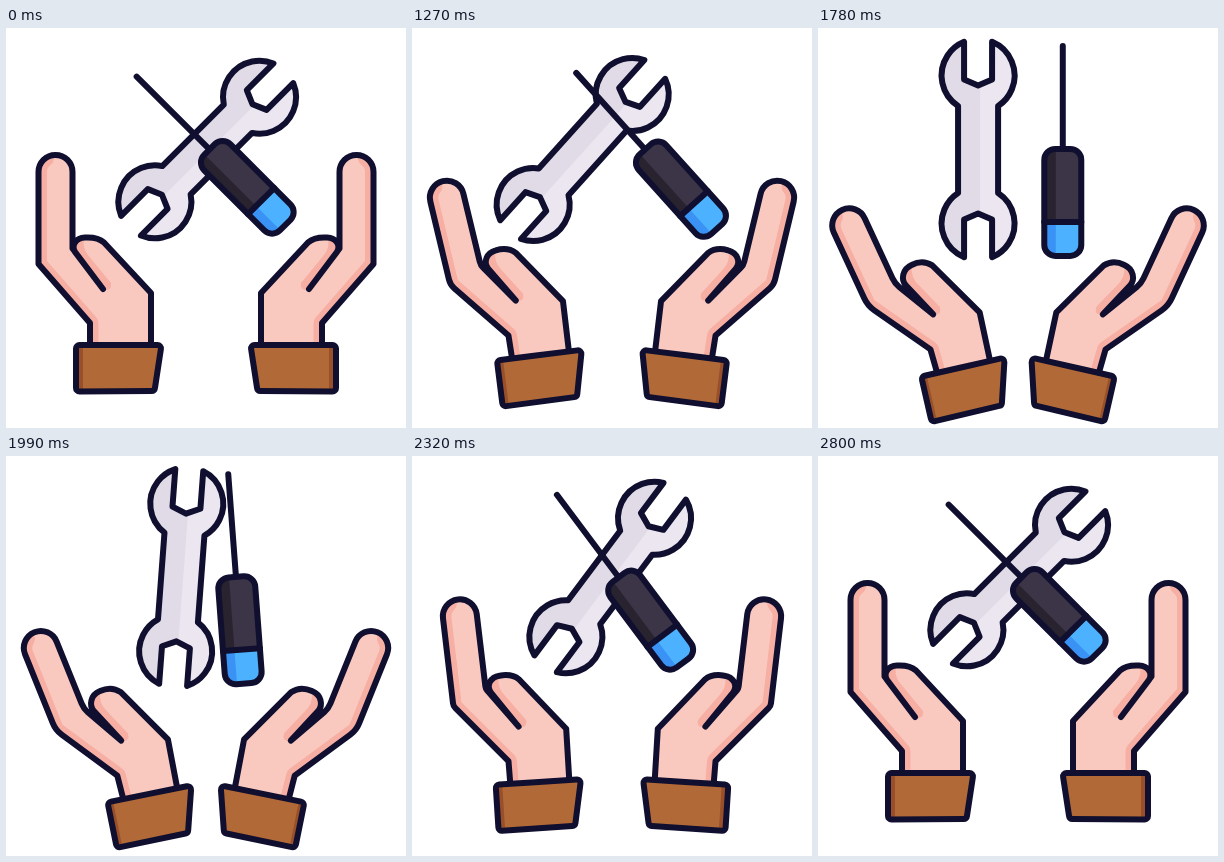
Recreate the animation shown at these times as an HTML page with a canvas. Size 400 by 400 pixels, loop 2.83 s.

```html
<!DOCTYPE html>
<html lang="en">
<head>
<meta charset="utf-8">
<title>Tools between hands</title>
<style>
  html, body { margin: 0; width: 100%; height: 100%; overflow: hidden; background: #fff; }
  canvas { display: block; }
</style>
</head>
<body>
<canvas id="stage" width="400" height="400"></canvas>
<script>
const ctx = document.getElementById('stage').getContext('2d');
const LOOP = 2830, START = 1030, STEP = 30, DEG = Math.PI / 180;
const INK = '#100f2f', SKIN = '#f9c9c0', SKIN_SHADE = '#f7afa3';

// Motion tracks: [ms, value]
const SLIDE = [[1030, 0], [1270, 30.5], [1510, 53], [1990, 26], [2320, 3], [2470, 0]];
const TILT = [[1030, 45], [1170, 45], [1270, 42], [1510, 13.3], [1690, 0], [1870, 0],
              [1990, 4.3], [2320, 36.8], [2480, 45]];
const SHIFT = [[1030, 0], [1270, .49], [1510, .98], [1720, 1.06], [1990, 1], [2320, .43], [2690, 0]];
const OPEN = [[1030, 0], [1270, .55], [1510, 1], [1630, 1.02], [1990, .88], [2320, .28], [2640, 0]];

// Smooth interpolation that never overshoots its keys
function track(keys, t) {
  const last = keys.length - 1;
  if (t <= keys[0][0]) return keys[0][1];
  if (t >= keys[last][0]) return keys[last][1];
  const slope = i => (keys[i + 1][1] - keys[i][1]) / (keys[i + 1][0] - keys[i][0]);
  const tangent = i => {
    if (i === 0 || i === last) return 0;
    const a = slope(i - 1), b = slope(i);
    return a * b > 0 ? 2 * a * b / (a + b) : 0;
  };
  const i = keys.findIndex(k => k[0] > t) - 1;
  const [t0, v0] = keys[i], [t1, v1] = keys[i + 1];
  const d = t1 - t0, u = (t - t0) / d, s = u * u * (3 - 2 * u);
  return v0 + (v1 - v0) * s + d * u * (1 - u) * ((1 - u) * tangent(i) - u * tangent(i + 1));
}

function at(x, y, degrees, draw) {
  ctx.save();
  ctx.translate(x, y);
  ctx.rotate(degrees * DEG);
  draw();
  ctx.restore();
}

// Fill a path, paint its shading inside it, then outline it
function shape(path, fill, shade) {
  ctx.fillStyle = fill;
  ctx.fill(path);
  ctx.save();
  ctx.clip(path);
  shade();
  ctx.restore();
  ctx.stroke(path);
}

function rect(color, x, y, w, h) {
  ctx.fillStyle = color;
  ctx.fillRect(x, y, w, h);
}

function line(x0, y0, x1, y1) {
  ctx.beginPath();
  ctx.moveTo(x0, y0);
  ctx.lineTo(x1, y1);
  ctx.stroke();
}

function wrenchPath() {
  const path = new Path2D();
  for (const s of [1, -1]) {
    const turn = s > 0 ? 0 : Math.PI;
    const jaw = (y0, x0, y1, x1) => path.arc(0, -74 * s, 36.5,
      Math.atan2(y0, x0) + turn, Math.atan2(y1, x1) + turn);
    jaw(30.5, -20, -33.7, -14);
    path.lineTo(-14 * s, -70 * s);
    path.lineTo(0, -64 * s);
    path.lineTo(14 * s, -70 * s);
    jaw(-33.7, 14, 30.5, 20);
  }
  path.closePath();
  return path;
}

const WRENCH = wrenchPath(), HANDLE = new Path2D();
HANDLE.roundRect(-18.5, -2, 37, 107, 11);

function wrench() {
  shape(WRENCH, '#e0dbe6', () => rect('#ebe6f0', 2, -112, 40, 224));
}

function screwdriver() {
  line(0, -105, 0, -2);
  shape(HANDLE, '#3c3447', () => {
    rect('#292330', -19, -2, 12, 73);
    rect('#4cb2ff', -19, 71, 38, 35);
    rect('#3a92f5', -19, 71, 12, 35);
  });
  line(-18.5, 71, 18.5, 71);
}

function hand(shift, open) {
  const mix = (a, b) => a + (b - a) * open;
  const tip = [mix(49.5, 34.8), mix(144, 153.6), 17], lean = 12 * DEG * open;
  const heel = [mix(32.5, 35), 236], wrist = [mix(84, 86.5), mix(295, 292.5)];
  const sleeve = [mix(84, 88), 320];
  const crease = [97, mix(261, 259)], base = [mix(69, 77), mix(224, 225)];
  const thumbTip = [mix(65, 73), mix(217, 218), mix(70, 77), mix(210, 208), mix(79, 87), mix(209.5, 206)];

  const palm = new Path2D();
  palm.arc(...tip, Math.PI - lean, 2 * Math.PI - lean);
  palm.arcTo(66.5, 220.5, ...crease, 25 * open);
  palm.lineTo(...crease);
  palm.lineTo(...base);
  palm.bezierCurveTo(...thumbTip);
  palm.bezierCurveTo(mix(87, 95), mix(209, 204), mix(93, 102), mix(210, 206), mix(98, 107), mix(214.5, 211));
  palm.lineTo(mix(145, 142.7), mix(265, 267.5));
  palm.lineTo(mix(145, 142), 320);
  palm.lineTo(...sleeve);
  palm.lineTo(...wrist);
  palm.arcTo(...heel, tip[0] - 17, tip[1], 30 * open);
  palm.closePath();

  const edge = new Path2D();
  edge.moveTo(...sleeve);
  edge.lineTo(...wrist);
  edge.lineTo(...heel);
  edge.arc(...tip, Math.PI - lean, 1.3 * Math.PI - lean);

  const thumb = new Path2D();
  thumb.moveTo(...crease);
  thumb.lineTo(...base);
  thumb.bezierCurveTo(...thumbTip);
  thumb.quadraticCurveTo(base[0] + 6, base[1] - 6, base[0] + 13, base[1] + 3);
  thumb.lineTo(crease[0] + 8, crease[1] - 6);
  thumb.quadraticCurveTo(crease[0] + 9, crease[1] + 3, ...crease);

  const cuff = new Path2D();
  const corners = [[mix(155.5, 157), 317], [mix(148.5, 143.5), 363], [mix(70, 71.5), 363.5], [mix(70, 71.5), 317]];
  cuff.moveTo(110, 317);
  corners.forEach((corner, i) => cuff.arcTo(...corner, ...(corners[i + 1] || [110, 317]), 3.5));
  cuff.closePath();

  at(111 + 34 * shift, 340 + 21 * shift, -13 * open, () => {
    ctx.translate(-111, -340);
    shape(palm, SKIN, () => {
      ctx.lineWidth = 17;
      ctx.strokeStyle = ctx.fillStyle = SKIN_SHADE;
      ctx.stroke(edge);
      ctx.fill(thumb);
    });
    shape(cuff, '#b16a37', () => rect('#99502a', 69, 316, 8, 48));
  });
}

function draw(t) {
  ctx.setTransform(1, 0, 0, 1, 0, 0);
  rect('#fff', 0, 0, 400, 400);
  ctx.lineWidth = 6;
  ctx.strokeStyle = INK;
  ctx.lineCap = ctx.lineJoin = 'round';

  const slide = track(SLIDE, t), tilt = track(TILT, t);
  const shift = track(SHIFT, t), open = track(OPEN, t);
  at(201.2 - slide, 121.5, tilt, wrench);
  at(204.9 + .97 * slide, 122.9, -tilt, screwdriver);
  hand(shift, open);
  ctx.translate(400, 0);
  ctx.scale(-1, 1);
  hand(shift, open);
}

const begin = performance.now();
function tick() {
  const t = (performance.now() - begin) % LOOP;
  draw(t < START ? 0 : START + Math.floor((t - START) / STEP) * STEP);
  requestAnimationFrame(tick);
}
tick();
</script>
</body>
</html>
```
